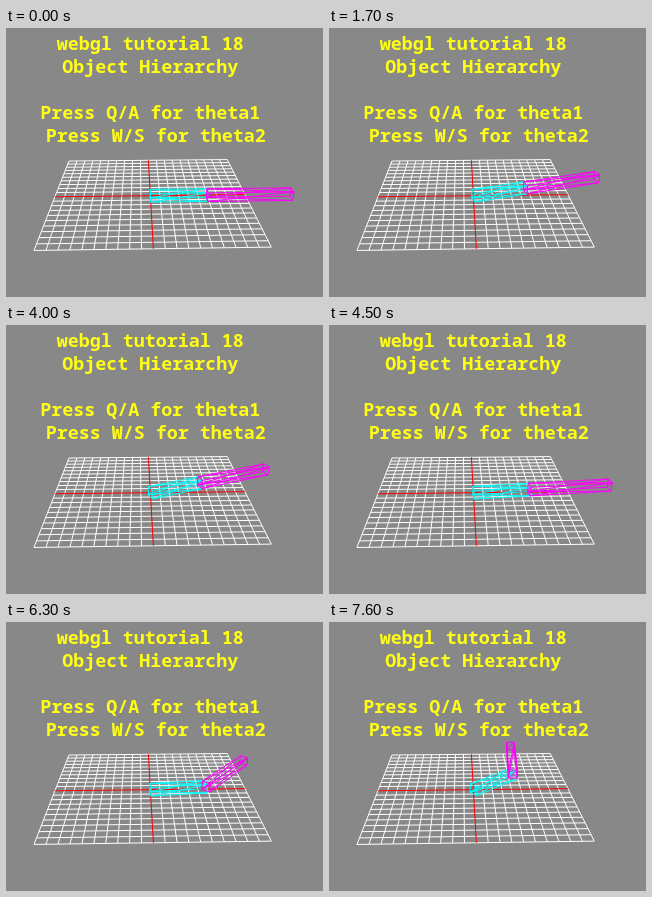
An HTML page with a canvas for the animation above (8 s loop, 317 by 269 pixels).

```html
<!DOCTYPE html>
<html lang="en">
<head>
<meta charset="utf-8">
<title>Object Hierarchy</title>
<style>
  html, body { margin: 0; width: 100%; height: 100%; overflow: hidden; background: #888; }
  canvas, svg { position: absolute; left: 0; top: 0; width: 317px; height: 269px; }
  text { font: bold 18.33px "Noto Sans Mono", "DejaVu Sans Mono", monospace; fill: #ffff14; text-anchor: middle; }
</style>
</head>
<body>
<canvas id="scene" width="317" height="269"></canvas>
<svg viewBox="0 0 317 269">
  <text x="144.3" y="22">webgl tutorial 18</text>
  <text x="144.3" y="45">Object Hierarchy</text>
  <text x="144.3" y="91">Press Q/A for theta1</text>
  <text x="149.8" y="114">Press W/S for theta2</text>
</svg>
<script>
const ctx = document.getElementById('scene').getContext('2d');
const LOOP = 8000, STEP = 0.1;
const CENTER = [144.4, 167.7], SCALE = 9.5;
const EYE = [-1, 20, 40];
const DIST = Math.hypot(...EYE);
const yaw = Math.atan2(EYE[0], EYE[2]), pitch = Math.asin(EYE[1] / DIST);

// Key presses: each moves one joint by one step.
const presses = [
  { joint: 0, dir: 1, at: [900, 1500, 1700, 2100, 2300, 2500, 2600] },
  { joint: 0, dir: -1, at: [3600, 3700, 4000, 4100, 4300, 4500] },
  { joint: 1, dir: 1, at: [5200, 5400, 5500, 5700, 5800, 6000, 6100, 6300] },
  { joint: 0, dir: 1, at: [6600, 6800, 6900, 7100, 7300, 7600] }
];

function anglesAt(time) {
  const steps = [0, 0];
  for (const { joint, dir, at } of presses)
    steps[joint] += dir * at.filter(t => t <= time).length;
  return steps.map(n => n * STEP);
}

function project([x, y, z]) {
  const side = x * Math.cos(yaw) - z * Math.sin(yaw);
  const near = z * Math.cos(yaw) + x * Math.sin(yaw);
  const up = y * Math.cos(pitch) - near * Math.sin(pitch);
  const depth = 1 - (near * Math.cos(pitch) + y * Math.sin(pitch)) / DIST;
  return [CENTER[0] + SCALE * side / depth, CENTER[1] - SCALE * up / depth];
}

function drawLines(color, lines) {
  ctx.strokeStyle = color;
  ctx.beginPath();
  for (const [a, b] of lines) {
    ctx.moveTo(...project(a));
    ctx.lineTo(...project(b));
  }
  ctx.stroke();
}

const alongX = z => [[-10, 0, z], [10, 0, z]];
const alongZ = x => [[x, 0, -10], [x, 0, 10]];
const gridLines = [];
for (let i = -10; i <= 10; i++)
  if (i) gridLines.push(alongX(i), alongZ(i));

// Box edges join corners one bit apart; each face also has one diagonal.
const boxEdges = [];
for (let i = 0; i < 8; i++)
  for (let j = i + 1; j < 8; j++) {
    const bits = [1, 2, 4].filter(b => (i ^ j) & b).length;
    if (bits === 1 || (bits === 2 && (i === 0 || j === 7))) boxEdges.push([i, j]);
  }

const ahead = ([x, z], angle, length) =>
  [x + length * Math.cos(angle), z - length * Math.sin(angle)];

function drawBox(color, base, angle, length) {
  const corners = Array.from({ length: 8 }, (_, i) => {
    const side = i & 4 ? 0.5 : -0.5;
    const [x, z] = ahead(base, angle, i & 1 ? length : 0);
    return [x + side * Math.sin(angle), i & 2 ? 0.5 : -0.5, z + side * Math.cos(angle)];
  });
  drawLines(color, boxEdges.map(([i, j]) => [corners[i], corners[j]]));
}

function frame() {
  const [theta1, theta2] = anglesAt(performance.now() % LOOP);
  ctx.fillStyle = '#888';
  ctx.fillRect(0, 0, 317, 269);
  ctx.lineWidth = 1;
  drawLines('#fff', gridLines);
  drawLines('#f00', [alongX(0), alongZ(0)]);
  drawBox('#0ff', [0, 0], theta1, 6);
  drawBox('#f0f', ahead([0, 0], theta1, 6), theta1 + theta2, 9);
  requestAnimationFrame(frame);
}
frame();
</script>
</body>
</html>
```
